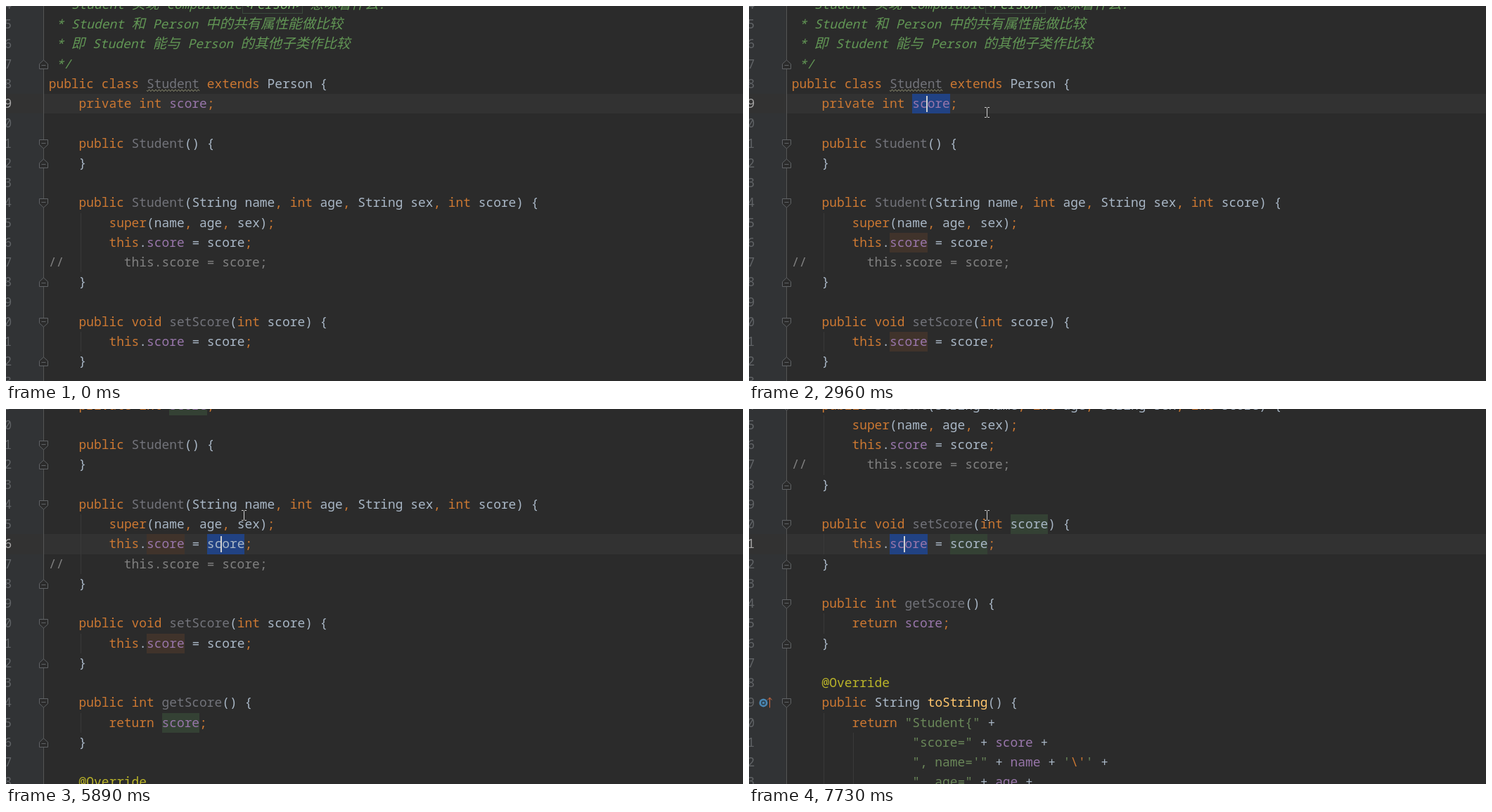
These frames come from a looping animation (1048x534 px, 8000 ms). An HTML page with a canvas:

```html
<!DOCTYPE html>
<html lang="en">
<head>
<meta charset="utf-8">
<title>Code editor</title>
<style>
html, body { margin: 0; width: 100%; height: 100%; overflow: hidden; background: #2b2b2b; }
canvas { display: block; }
</style>
</head>
<body>
<canvas id="stage" width="1048" height="534"></canvas>
<script>
const ctx = document.getElementById('stage').getContext('2d');
const LOOP = 8000, LEFT = 60.7, CHAR = 10.72, WIDE = 19.5, ROW = 28.25, FIRST = 4;
const MONO = '17.867px "Noto Sans Mono", "DejaVu Sans Mono", monospace';
const HAN = '19.5px "Noto Sans CJK SC", "Noto Sans CJK", sans-serif';
const C = {
  text: '#a9b7c6', key: '#cc7832', field: '#9876aa', unused: '#72737a', note: '#808080',
  doc: '#629755', tag: '#77b767', string: '#6a8759', method: '#ffc66d', annotation: '#bbb529'
};

// Prefixes: ~ field, ^ unused name, # method name
const codeLines = String.raw` * Student 实现 Comparable<Person> 意味着什么？
 * Student 和 Person 中的共有属性能做比较
 * 即 Student 能与 Person 的其他子类作比较
 */
public class ^Student extends Person {
    private int ~score;

    public ^Student() {
    }

    public ^Student(String name, int age, String sex, int score) {
        super(name, age, sex);
        this.~score = score;
//        this.score = score;
    }

    public void ^setScore(int score) {
        this.~score = score;
    }

    public int ^getScore() {
        return ~score;
    }

    @Override
    public String #toString() {
        return "Student{" +
                "score=" + ~score +
                ", name='" + ~name + '\'' +
                ", age=" + ~age +`.split('\n');

const keywords = /^(public|private|class|extends|int|void|return|super|this|[,;])$/;
const foldStarts = [11, 14, 20, 24, 29], foldEnds = [7, 12, 18, 22, 26];
const guides = [[4, 15, 17], [4, 21, 21], [4, 25, 25], [4, 30, 34], [8, 31, 34]];

// time, line, start column of the word holding the caret
const carets = [[0, 9], [1150, 9, 16], [4830, 14, 57], [5420, 16, 13], [5890, 16, 21],
  [6350, 17, 15], [6880, 17, 23], [7340, 20, 29], [7730, 21, 13]];

// line, column, written to
const fieldUse = [[9, 16], [16, 13, true], [21, 13, true], [25, 15], [31, 27]];
const argUse = [[14, 57], [16, 21]];
const setterUse = [[20, 29], [21, 21]];
const usages = [[0, []], [1220, fieldUse], [5160, argUse], [5690, fieldUse],
  [6220, argUse], [6680, []], [7600, setterUse]];

// pointer stops after the long sweep
const pointerStops = [[870, 268, 144], [940, 262, 141], [1010, 258, 138], [1080, 257, 138],
  [1290, 283, 142], [1360, 318, 148], [1430, 338, 151]];

const latest = (list, t) => list.filter(e => e[0] <= t).pop();
const within = (t, a, b) => t >= a && t < b;
const colX = col => LEFT + col * CHAR;
const pageY = n => 125 + (n - 9) * ROW;
let shift = 0;
const rowY = n => pageY(n) - shift;

function box(x, y, w, h, color) {
  ctx.fillStyle = color;
  ctx.fillRect(Math.round(x), Math.round(y), Math.round(x + w) - Math.round(x), Math.round(y + h) - Math.round(y));
}

function wordBox(line, col, color) {
  box(colX(col), rowY(line), 5 * CHAR, ROW, color);
}

function trace(color, points, close) {
  ctx.strokeStyle = color;
  ctx.lineWidth = 1;
  ctx.beginPath();
  points.forEach(([x, y]) => ctx.lineTo(x, y));
  if (close) ctx.closePath();
  ctx.stroke();
}

function dot(x, y, r, color) {
  ctx.fillStyle = color;
  ctx.beginPath();
  ctx.arc(x, y, r, 0, 7);
  ctx.fill();
}

function put(str, x, y, color) {
  ctx.fillStyle = color;
  ctx.fillText(str, x, y);
}

function drawDoc(str, y) {
  let x = LEFT;
  for (const part of str.match(/<\w+>|[\u3000-\uffff]|[^<\u3000-\uffff]+/g)) {
    const wide = part > '\u3000', tag = part[0] === '<';
    const w = wide ? WIDE : part.length * CHAR;
    ctx.font = 'italic ' + (wide ? HAN : MONO);
    if (tag) {
      ctx.lineWidth = 1;
      ctx.strokeStyle = '#3a4a3c';
      ctx.strokeRect(Math.round(x) + .5, Math.round(y - 20) + .5, Math.round(w) - 1, 26);
    }
    put(part, x, y, tag ? C.tag : C.doc);
    x += w;
  }
}

function drawCode(str, y) {
  ctx.font = MONO;
  if (str.startsWith('//')) return put(str, LEFT, y, C.note);
  let col = 0;
  const emit = (s, color) => { put(s, colX(col), y, color); col += s.length; };
  for (const part of str.match(/[~^#@]?\w+|"[^"]*"|'\\''|\s+|./g) || []) {
    const prefix = { '~': C.field, '^': C.unused, '#': C.method }[part[0]];
    if (prefix) emit(part.slice(1), prefix);
    else if (part[0] === '@') emit(part, C.annotation);
    else if (part[0] === '"') emit(part, C.string);
    else if (part[0] === "'") {
      emit("'", C.string);
      emit("\\'", C.key);
      emit("'", C.string);
    } else emit(part, keywords.test(part) ? C.key : C.text);
  }
}

function drawFold(line, dir) {
  const y = Math.round(rowY(line) + ROW / 2) + .5, x = 53.5;
  const shape = [[-6, -6], [6, -6], [6, 1], [0, 6.5], [-6, 1]].map(([a, b]) => [x + a, y + b * dir]);
  ctx.fillStyle = '#2b2b2b';
  ctx.beginPath();
  shape.forEach(p => ctx.lineTo(...p));
  ctx.fill();
  trace('#606366', shape, true);
  trace('#606366', [[x - 3, y - dir], [x + 3, y - dir]]);
}

function drawOverride() {
  const y = rowY(29) + ROW / 2;
  dot(20.5, y, 6, '#4a88b5');
  dot(20.5, y, 3.4, '#2f4350');
  dot(20.5, y, 1.7, '#4a88b5');
  trace('#d0693f', [[29.5, y + 7], [29.5, y - 7]]);
  trace('#d0693f', [[26.5, y - 4], [29.5, y - 7.5], [32.5, y - 4]]);
}

function drawWave() {
  const y = rowY(8) + 23.5, points = [];
  for (let x = colX(13); x <= colX(20); x++) points.push([x, y + 1.3 * Math.sin(x * 1.35)]);
  trace('#8c8c70', points);
}

function drawBulb() {
  dot(74, 134, 4.5, '#e0b44c');
  box(72, 138, 4, 4, '#a0a0a0');
}

function drawPointer(t) {
  if (t < 110) return;
  let [, x, y] = latest(pointerStops, t) || [];
  if (t < 870) {
    const k = Math.floor((t - 110) / 69.1) / 11, e = k * k * (3 - 2 * k);
    x = 763 - 495 * e;
    y = 451 - 307 * e;
  }
  x = Math.round(x) + .5;
  y = Math.round(y) + .5;
  const color = '#d0d0d0';
  trace(color, [[x, y - 6], [x, y + 6]]);
  for (const s of [-1, 1]) {
    trace(color, [[x - 3.5, y + 7 * s], [x - 1, y + 7 * s], [x, y + 6 * s], [x + 1, y + 7 * s], [x + 3.5, y + 7 * s]]);
  }
}

function draw(t) {
  const [, line, col] = latest(carets, t);
  shift = Math.max(0, pageY(line) - 178.25);

  box(0, 0, 1048, 534, '#2b2b2b');
  box(0, 0, 53, 534, '#313335');
  box(0, rowY(line), 1048, ROW, '#323232');
  for (const [c, a, b] of guides) box(colX(c) + 2, rowY(a), 1, (b - a + 1) * ROW, '#393939');
  for (const [l, c, write] of latest(usages, t)[1]) wordBox(l, c, write ? '#40332b' : '#344134');
  if (t >= 2960) wordBox(line, col, '#214283');

  box(53, 0, 1, 534, '#555555');
  foldStarts.forEach(n => drawFold(n, 1));
  foldEnds.forEach(n => drawFold(n, -1));
  drawOverride();
  codeLines.forEach((str, i) => {
    const n = i + FIRST, y = Math.round(rowY(n) + 20);
    ctx.font = MONO;
    put(String(n % 10), -2.5, y, n === line ? '#a4a3a3' : '#606366');
    (n < 8 ? drawDoc : drawCode)(str, y);
  });
  drawWave();

  const blink = within(t, 2160, 2690) || within(t, 4170, 4700);
  if (col && !blink) box(Math.round(colX(col + 2)) - 2, rowY(line) + 3, 2, 23, '#d0d0d0');
  if (within(t, 1960, 2960) || within(t, 3770, 4830)) drawBulb();
  drawPointer(t);
}

const begin = performance.now();
function tick() {
  draw((performance.now() - begin) % LOOP);
  requestAnimationFrame(tick);
}
tick();
</script>
</body>
</html>
```
